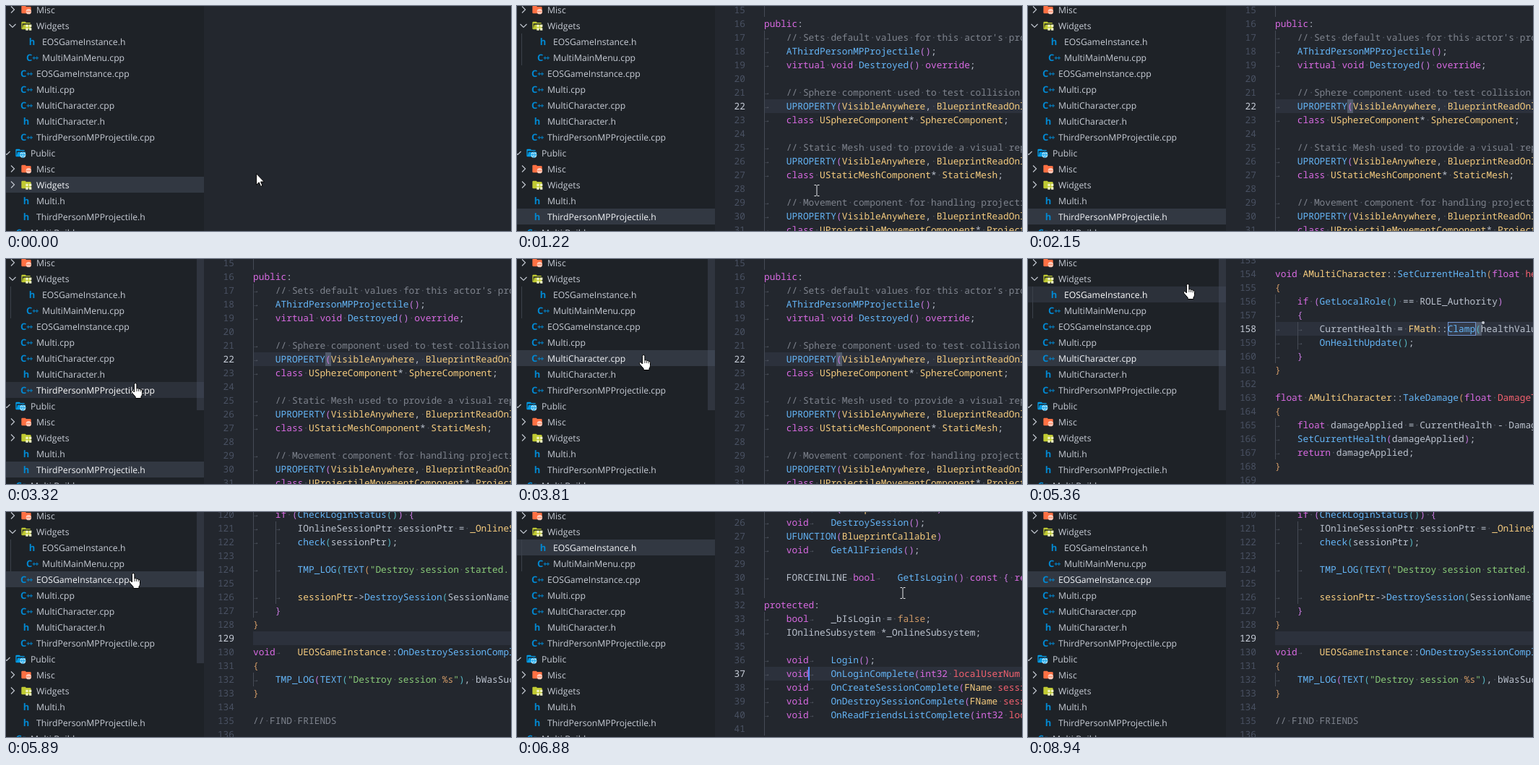
Write an HTML page that moves like this. It is 699x311 px and loops after 9060 ms.

```html
<!DOCTYPE html>
<html lang="en">
<head>
<meta charset="utf-8">
<title>Switching between source files</title>
<style>
html, body { margin: 0; width: 100%; height: 100%; overflow: hidden; background: #23272e; }
#stage { position: relative; width: 699px; height: 311px; overflow: hidden; background: #23272e; color: #bcc3cf; }
#stage div, #stage svg { position: absolute; }
#side { left: 0; top: 0; width: 274px; height: 311px; overflow: hidden; background: #1e2227; color: #c8cdd6;
  font: 12.2px/22px "Open Sans", "Noto Sans", sans-serif; text-rendering: geometricPrecision; }
.row { left: 0; width: 274px; height: 22px; white-space: pre; }
.row.hover { background: #2c313a; color: #fff; }
.row.sel { background: #323842; color: #f4f6f9; }
.label { top: .5px; }
.glyph { top: 0; width: 16px; text-align: center; color: #0288d1; font-weight: 700; font-size: 13px; }
.glyph b { font-size: 9px; letter-spacing: -1.2px; vertical-align: 1px; }
#guide { left: 6px; top: 38px; width: 1px; height: 44px; background: #3b414b; }
#bar { left: 264px; top: 0; width: 10px; height: 209px; background: #4e5666; opacity: .38; }
.view { left: 274px; top: 0; width: 425px; height: 311px; overflow: hidden;
  font: 500 12.83px/19px "Noto Sans Mono", "DejaVu Sans Mono", monospace; text-rendering: geometricPrecision; }
.line { left: 0; width: 425px; height: 19px; }
.num { left: 0; width: 42px; text-align: right; color: #495162; font-weight: 400; }
.active .num { color: #c8ced9; }
.active .code { background: #2c313c; }
.code { left: 68px; width: 357px; height: 19px; white-space: pre; }
.code i { font-style: normal; color: #4f5561; }
.code i.tab { display: inline-block; transform: scale(.8); color: #5a606c; }
.code span { position: relative; }
.indent { top: 0; width: 1px; height: 19px; background: #454b56; }
.match { background: #515a6b; }
.word { box-sizing: border-box; border: 1px solid #6f93cf; background: #343b49; }
.dot { width: 4px; height: 4px; border-radius: 2px; background: #c8ccd4; }
#caret { width: 2px; height: 19px; background: #528bff; }
#mouse svg { left: 0; top: 0; overflow: visible; }
#mouse svg[data-kind=hand] { left: -2px; }
</style>
</head>
<body>
<div id="stage"><div id="side"></div></div>
<script>
const LOOP = 9060, CHAR = 7.697, LEFT = 68;
const stage = document.getElementById('stage'), side = document.getElementById('side');

function add(parent, cls, css = {}, html = '') {
  const el = document.createElement('div');
  el.className = cls;
  el.innerHTML = html;
  for (const k in css) el.style[k] = typeof css[k] === 'number' ? css[k] + 'px' : css[k];
  parent.append(el);
  return el;
}

// Explorer tree: kind, text left edge, label
const tree = [
  ['misc', 42, 'Misc'], ['open', 42, 'Widgets'],
  ['h', 50, 'EOSGameInstance.h'], ['cpp', 50, 'MultiMainMenu.cpp'],
  ['cpp', 42, 'EOSGameInstance.cpp'], ['cpp', 42, 'Multi.cpp'],
  ['cpp', 42, 'MultiCharacter.cpp'], ['h', 42, 'MultiCharacter.h'],
  ['cpp', 42, 'ThirdPersonMPProjectile.cpp'], ['public', 34, 'Public'],
  ['misc', 42, 'Misc'], ['widgets', 42, 'Widgets'],
  ['h', 42, 'Multi.h'], ['h', 42, 'ThirdPersonMPProjectile.h'],
  ['cs', 34, 'Multi.Build.cs']
];
const CLOSED = 'M10 4H4a2 2 0 0 0-2 2v12a2 2 0 0 0 2 2h16a2 2 0 0 0 2-2V8a2 2 0 0 0-2-2h-8z';
const OPEN = 'M19 20H4a2 2 0 0 1-2-2V6a2 2 0 0 1 2-2h6l2 2h7a2 2 0 0 1 2 2H4v10l2-8h17l-2 8.5a2 2 0 0 1-2 1.5z';
const GRID = '<path fill="#f0f4c3" d="M11 10h5v5h-5zM18 10h5v5h-5zM11 17h5v5h-5zM18 17h5v5h-5z"/>';
const folders = {
  misc: ['#ff7043', CLOSED, '<circle cx="17" cy="16" r="5.5" fill="#ffccbc"/><path d="M13 16h8" stroke="#ff7043" stroke-width="2" stroke-dasharray="2 1"/>'],
  widgets: ['#c0ca33', CLOSED, GRID],
  open: ['#c0ca33', OPEN, GRID],
  public: ['#039be5', OPEN, '<circle cx="17" cy="16" r="6" fill="#b3e5fc"/><path d="M11 16h12M17 10q-5 6 0 12q5-6 0-12" fill="none" stroke="#039be5" stroke-width="1.4"/>']
};
const letters = { h: 'h', cpp: 'C<b>++</b>', cs: 'C<b>#</b>' };

const rows = tree.map(([kind, x, label], i) => {
  const row = add(side, 'row', { top: i * 22 - 6 });
  const folder = folders[kind];
  if (folder) {
    const [color, path, mark] = folder;
    const down = kind === 'open' || kind === 'public';
    const arrow = down ? 'M-4.5-2L0 2.5L4.5-2' : 'M-2-4.5L2.5 0L-2 4.5';
    row.innerHTML = `<svg width="50" height="22"><path transform="translate(${x - 33} 11)" d="${arrow}" fill="none" stroke="#c0c5ce" stroke-width="1.2"/>
      <g transform="translate(${x - 22} 3) scale(.667)"><path fill="${color}" d="${path}"/>${mark}</g></svg>`;
  } else {
    add(row, 'glyph', { left: x - 22 }, letters[kind]);
  }
  add(row, 'label', { left: x }, label);
  return row;
});
const guide = add(side, '');
guide.id = 'guide';
const bar = add(side, '');
bar.id = 'bar';

// Syntax colouring
const PURPLE = '#d96ae2', BLUE = '#65b6f8', YELLOW = '#f7cd7f', RED = '#f4616f', ORANGE = '#d19a66';
const DEPTH = ['#d19a66', '#c678dd', '#56b6c2'];
const keywords = /^(public|protected|class|virtual|void|override|float|if|return|bool|const|int32)$/;
const types = /^(U[A-Z]+[a-z]|FName|Visible|Blueprint)/;
const esc = s => s.replace(/&/g, '&amp;').replace(/</g, '&lt;').replace(/>/g, '&gt;');
const paint = (color, s) => `<span style="color:${color}">${s}</span>`;
const blanks = s => s.replace(/ /g, '<i>·</i>').replace(/→/g, '<i class="tab">→</i>');

function expandTabs(s) {
  let out = '';
  for (const c of s) out += c === '\t' ? '→'.padEnd(4 - out.length % 4, '\u00a0') : c;
  return out;
}

function wordColor(word, before, after) {
  if (keywords.test(word)) return PURPLE;
  if (word === 'false') return ORANGE;
  if (after[0] === '(') return BLUE;
  if (/^(::|->)/.test(after) || types.test(word) || before.endsWith('* ')) return YELLOW;
  if (/\(.*(float|int32|FName|bool) $/.test(before)) return RED;
  return '';
}

function highlight(text, state) {
  return text.replace(/(\/\/.*)|("[^"]*")|([A-Za-z_]\w*)|([({])|([)}])|[^]/g,
    (all, comment, string, word, open, close, pos) => {
      const s = esc(all);
      if (comment) return paint('#7f848e', blanks(s));
      if (string) return paint('#89ca78', blanks(s).replace('%s', paint(ORANGE, '%s')));
      if (open) return paint(DEPTH[state.depth++ % 3], s);
      if (close) return paint(DEPTH[--state.depth % 3], s);
      if (!word) return blanks(s);
      const color = wordColor(word, text.slice(0, pos), text.slice(pos + word.length));
      return color ? paint(color, s) : s;
    });
}

// A leading "|" stands for an indent guide on an empty line
function makeView(first, top, active, depth, source) {
  const view = add(stage, 'view'), state = { depth };
  source.split('\n').forEach((raw, i) => {
    const n = first + i;
    const line = add(view, n === active ? 'line active' : 'line', { top: top + i * 19 });
    add(line, 'num', {}, n);
    const guides = raw.match(/^[\t|]*/)[0].length;
    const code = add(line, 'code');
    code.innerHTML = `<span>${highlight(expandTabs(raw.replace(/\|/g, '')), state)}</span>`;
    for (let g = 0; g < guides; g++) add(line, 'indent', { left: LEFT + Math.round(g * 4 * CHAR) });
  });
  return view;
}

const prop = '\tUPROPERTY(VisibleAnywhere, BlueprintReadOnly, Category = "Components")';
const views = {
  projectile: makeView(15, -4, 22, 1, `|
public:
\t// Sets default values for this actor's properties
\tAThirdPersonMPProjectile();
\tvirtual void Destroyed() override;
|
\t// Sphere component used to test collision
${prop}
\tclass USphereComponent* SphereComponent;
|
\t// Static Mesh used to provide a visual representation
${prop}
\tclass UStaticMeshComponent* StaticMesh;
|
\t// Movement component for handling projectile movement
${prop}
\tclass UProjectileMovementComponent* ProjectileMovement;`),
  character: makeView(153, -8, 158, 0, `
void AMultiCharacter::SetCurrentHealth(float healthValue)
{
\tif (GetLocalRole() == ROLE_Authority)
\t{
\t\tCurrentHealth = FMath::Clamp(healthValue, 0.f, MaxHealth);
\t\tOnHealthUpdate();
\t}
}

float AMultiCharacter::TakeDamage(float DamageTaken)
{
\tfloat damageApplied = CurrentHealth - DamageTaken;
\tSetCurrentHealth(damageApplied);
\treturn damageApplied;
}
`),
  instance: makeView(120, -6, 129, 1, `\tif (CheckLoginStatus()) {
\t\tIOnlineSessionPtr sessionPtr = _OnlineSubsystem->GetSessionInterface();
\t\tcheck(sessionPtr);
||
\t\tTMP_LOG(TEXT("Destroy session started. "));
||
\t\tsessionPtr->DestroySession(SessionName);
\t}
}

void\tUEOSGameInstance::OnDestroySessionComplete(FName sessionName)
{
\tTMP_LOG(TEXT("Destroy session %s"), bWasSuccessful);
}

// FIND FRIENDS
`),
  header: makeView(25, -14, 37, 1, `\tUFUNCTION(BlueprintCallable)
\tvoid\tDestroySession();
\tUFUNCTION(BlueprintCallable)
\tvoid\tGetAllFriends();
|
\tFORCEINLINE\tbool\tGetIsLogin() const { return _bIsLogin; }
|
protected:
\tbool\t_bIsLogin = false;
\tIOnlineSubsystem *_OnlineSubsystem;
|
\tvoid\tLogin();
\tvoid\tOnLoginComplete(int32 localUserNum, bool ok);
\tvoid\tOnCreateSessionComplete(FName sessionName);
\tvoid\tOnDestroySessionComplete(FName sessionName);
\tvoid\tOnReadFriendsListComplete(int32 localUserNum);
|`)
};

// Bracket and word marks sit behind the active line's text
function mark(view, cls, left, width) {
  const code = view.querySelector('.active .code');
  const el = add(code, cls, { left: left - 342, top: 0, width, height: 19 });
  code.prepend(el);
  return el;
}
const bracket = mark(views.projectile, 'match', 442, 8);
const clampMarks = [
  mark(views.character, 'word', 581, 39),
  mark(views.character, 'match', 620, 8),
  add(views.character, 'dot', { left: 354, top: 86 })
];

const caret = add(stage, '');
caret.id = 'caret';

const mouse = add(stage, '');
mouse.id = 'mouse';
mouse.innerHTML = `
<svg data-kind="arrow" width="12" height="19"><path d="M.6.8V16.2L4.2 12.8L6.6 18.4L9 17.4L6.6 12H11.4z" fill="#fff" stroke="#000"/></svg>
<svg data-kind="hand" width="18" height="22"><path d="M5.5 13V2.5q0-2 1.7-2t1.7 2V8q1.5-1 2.6.6q1.5-.9 2.6.7q2.4-.6 2.4 2v4.2q0 2-1.5 3.5V21.5H7.2V19.5L2 13.5q-1.5-2 .3-2.8q1.2-.4 3.2 2.3z" fill="#fff" stroke="#000"/><path d="M9 8v4M11.6 9v3M14.2 9.8v2.6" stroke="#000" stroke-width=".8"/></svg>
<svg data-kind="beam" width="8" height="16"><path d="M.5.5H3L4 1.5L5 .5H7.5M4 1.5V14.5M.5 15.5H3L4 14.5L5 15.5H7.5" fill="none" stroke="#e6e8eb"/></svg>`;
const cursors = [...mouse.children];

// Step tracks: time, then the value held until the next step
const selection = [[0, 11], [710, 13], [3680, 6], [5770, 4], [6640, 2], [7150, 4]];
const openFile = [[0, ''], [980, 'projectile'], [3950, 'character'], [5890, 'instance'], [6760, 'header'], [7150, 'instance']];
const guideAlpha = [[0, 0], [710, .5], [830, 1], [1460, .5], [1580, 0], [3080, .5], [3200, 1], [4190, .5], [4310, 0],
  [5210, .5], [5360, 1], [7420, .8], [7540, .6], [7660, .4], [7780, .2], [7900, 0]];
const pointer = [
  [0, 346, 231, 'arrow'], [410, 334, 239, 'arrow'], [560, 210, 283, 'hand'], [830, 204, 284, 'hand'],
  [1100, 320, 270, 'beam'], [1220, 411, 247, 'beam'], [1460, 396, 205, 'beam'], [1580, 379, 171, 'beam'],
  [1880, 662, 123, 'beam'], [2030, 684, 157, 'beam'], [2150, 720, 165, 'beam'],
  [2720, 650, 150, 'beam'], [2840, 540, 168, 'beam'], [2960, 420, 184, 'beam'], [3080, 262, 192, 'hand'],
  [3200, 196, 182, 'hand'], [3320, 174, 171, 'hand'], [3440, 172, 148, 'hand'], [3560, 170, 132, 'hand'],
  [4070, 250, 146, 'hand'], [4190, 400, 172, 'beam'], [4310, 540, 202, 'beam'], [4430, 626, 215, 'beam'],
  [4850, 622, 208, 'beam'], [5210, 610, 193, 'beam'], [5360, 216, 34, 'hand'], [5480, 174, 71, 'hand'],
  [5630, 171, 84, 'hand'], [6010, 168, 62, 'hand'], [6130, 166, 44, 'hand'],
  [6760, 330, 70, 'beam'], [6880, 530, 104, 'beam'], [8460, 560, 140, 'beam'], [8580, 595, 190, 'beam'],
  [8700, 630, 240, 'beam'], [8820, 655, 290, 'beam'], [8940, 660, 320, 'beam']
];

const at = (track, t) => track.reduce((now, step) => step[0] <= t ? step : now);
const show = (el, on) => { el.style.visibility = on ? 'visible' : 'hidden'; };
const within = (t, a, b) => t >= a && t < b;

function draw(t) {
  const [, x, y, kind] = at(pointer, t);
  const sel = at(selection, t)[1], file = at(openFile, t)[1];
  const inside = kind === 'hand';
  const hover = inside ? Math.floor((y + 17) / 22) : -1;

  rows.forEach((row, i) => {
    row.className = 'row' + (i === sel ? ' sel' : i === hover ? ' hover' : '');
  });
  for (const name in views) views[name].style.display = name === file ? 'block' : 'none';
  guide.style.opacity = at(guideAlpha, t)[1];
  show(bar, inside && t >= 710);
  show(bracket, t >= 1880);
  clampMarks.forEach(el => show(el, t >= 4700));

  const inHeader = file === 'header';
  caret.style.left = (inHeader ? 403 : 342) + 'px';
  caret.style.top = (inHeader ? 214 : 165) + 'px';
  show(caret, within(t, 6760, 7650) || within(t, 8150, 8650));

  mouse.style.transform = `translate(${x}px, ${y}px)`;
  cursors.forEach(c => show(c, c.dataset.kind === kind));
}

function tick(now) {
  draw(now % LOOP);
  requestAnimationFrame(tick);
}
draw(0);
requestAnimationFrame(tick);
</script>
</body>
</html>
```
